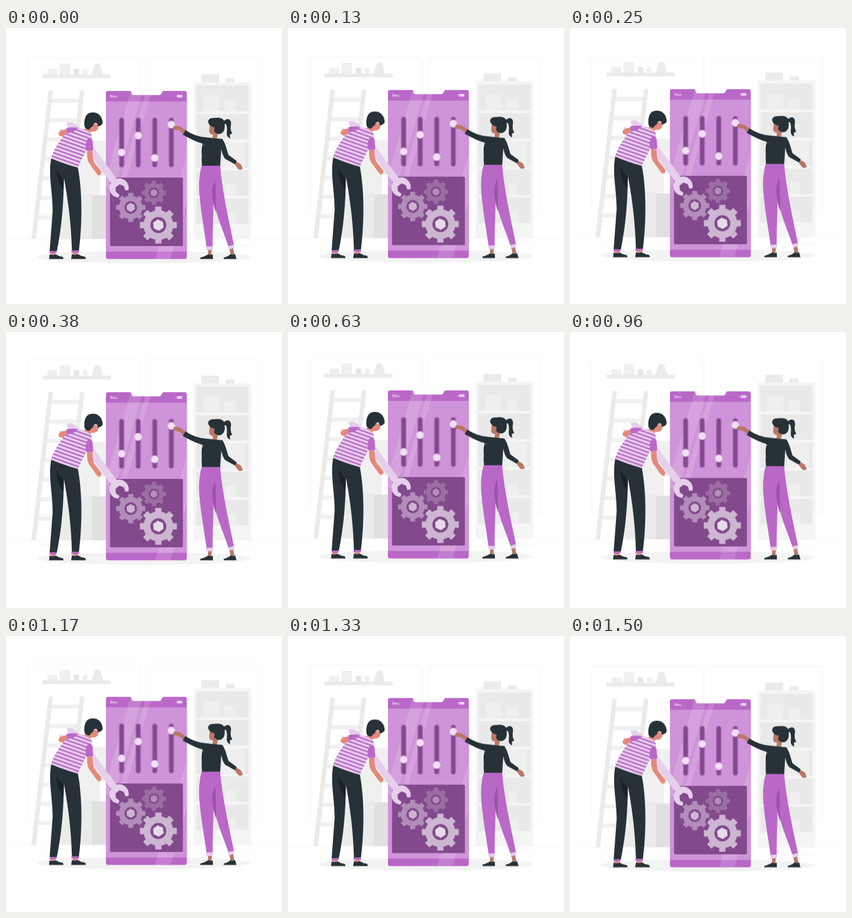
Recreate the animation shown at these times as an HTML page. Size 500 by 500 pixels, loop 1540 ms.

```html
<!DOCTYPE html>
<html lang="en">
<head>
<meta charset="utf-8">
<title>Phone settings</title>
<style>
  html, body { margin: 0; width: 100%; height: 100%; overflow: hidden; background: #fff; }
  svg { display: block; width: 100%; height: 100%; }
  #scene { animation: float 1.54s linear -40ms infinite; }
  @keyframes float {
    0%, 100% { transform: translateY(.5px); }
    50% { transform: translateY(-9.5px); }
  }
  .dark { fill: #263238; }
  .main { fill: #ba68c8; }
  .pale { fill: #e6cfeb; }
  .skin { fill: #e4897b; }
  .tan { fill: #b97764; }
</style>
</head>
<body>
<svg viewBox="0 0 500 500">
  <defs>
    <pattern id="stripes" width="20" height="6.6" patternUnits="userSpaceOnUse" patternTransform="translate(82 236) rotate(19.5)">
      <rect width="20" height="6.6" fill="#e6cfeb"/>
      <rect width="20" height="2.7" y="1" fill="#ba68c8"/>
    </pattern>
    <clipPath id="body">
      <path d="M185 114H225Q226.500 114 227 116L228 119.500Q229 121.500 231 121.500H278Q280 121.500 281 119.500L283 116Q284 114 286 114H323.500Q327.500 114 327.500 118V414.500Q327.500 418.500 323.500 418.500H185Q181 418.500 181 414.500V118Q181 114 185 114Z"/>
    </clipPath>
  </defs>
  <g id="scene">
    <!-- room -->
    <g fill="none" stroke="#f5f5f5">
      <rect x="39" y="54.500" width="203" height="282" rx="3"/>
      <rect x="255" y="54.500" width="203" height="282" rx="3"/>
      <path d="M0 382.300H500M57 390.500H115M412 394.500H447"/>
    </g>
    <g fill="#f0f0f0">
      <path d="M75 74H93V84H75ZM97 65H116V84H97Z"/>
      <circle cx="143.500" cy="79" r="5"/>
      <path fill="#e6e6e6" d="M123 74H132.500V84H123Z"/>
      <path fill="#ebebeb" d="M161 65H170L176 84H155ZM66 84H189.500V91H66Z"/>
      <path d="M118 204H181V268H170V382H118Z"/>
      <path fill="#ebebeb" d="M98 300H156V382H98Z"/>
      <path fill="#e0e0e0" d="M156 303H181V382H156Z"/>
    </g>
    <g id="rungs" fill="#f0f0f0"></g>
    <path fill="#ebebeb" d="M77 113.500H85L54.500 382H46ZM134 113.500H142L111.500 382H103Z"/>
    <!-- bookcase -->
    <path fill="#ebebeb" d="M354 84H386V98H354ZM398 91H414V98H398Z"/>
    <path fill="#f5f5f5" d="M340 98H444.500V382H340Z"/>
    <path fill="#e9e9e9" d="M345 104H439V355H345Z"/>
    <path fill="#efefef" d="M357 122H386V151H357ZM396 130H416V151H396ZM393 207H433V253H393ZM398 283H416V304H398ZM396 334H417V355H396Z"/>
    <path fill="#f5f5f5" d="M345 151H439V156H345ZM345 202H439V207H345ZM345 253H439V258H345ZM345 304H439V309H345Z"/>
    <ellipse cx="249.500" cy="415" rx="193.500" ry="11.500" fill="#f3f3f3"/>
    <!-- phone -->
    <g clip-path="url(#body)">
      <path class="main" d="M181 114H328V419H181Z"/>
      <path fill="#ce93d8" d="M181 133H328V405H181Z"/>
      <path fill="#fff" opacity=".14" d="M226 114H248L197 290H175ZM254 114H264L213 290H203ZM327.500 230V316L298 418.500H270Z"/>
    </g>
    <path class="pale" d="M189.500 121H191.500V126H189.500ZM193 122H195V126H193ZM196.300 122.700H198.300V126H196.300ZM199.600 123.400H201.500V126H199.600ZM310 121H319.500V126H310ZM307.500 122.500H309.200V124.500H307.500Z"/>
    <g id="sliders"></g>
    <rect x="188.500" y="271" width="132" height="124" rx="2" fill="#82498c"/>
    <g id="gears"></g>
    <!-- wrench -->
    <g class="pale">
      <path d="M109.500 172Q115 168.500 123 172L132 182L122 187L113 181Z"/>
      <g transform="translate(205 290) rotate(53.500)">
        <rect x="-142" y="-6.500" width="130" height="13" rx="5"/>
        <path d="M13 11.500A17.500 17.500 0 1 1 13 -11.500L10 -6.500L2 -9L-5 -4.500V4.500L2 9L10 6.500Z"/>
      </g>
    </g>
    <!-- man -->
    <g>
      <path class="skin" d="M80.500 405H90L89 412H81ZM121 404H130L130 411H121Z"/>
      <path class="dark" d="M79 410Q85 412.500 90 410Q96 414 102 414.500Q104.500 415.500 104 418.500H78ZM119.500 409.500Q125 412 130 409.500Q136 413.500 142 414Q145 415 144.500 418.500H118Z"/>
      <path class="dark" d="M82 236C76 266 85 300 84.500 332L79 405H92C100 366 104 328 105 272C112 310 118 350 119.500 404H132C138 358 139 298 130 252Z"/>
      <path fill="#1a2226" d="M92 256Q94 264 104 273L104 294Q91 280 92 256Z"/>
      <path class="main" d="M79 404H92L91 408H79ZM118.500 403H132.500L132 407H118.500Z"/>
      <path class="skin" d="M112 183L101 185Q94 188 95.500 193Q98 198 106 196.500L113 190Z"/>
      <path class="pale" d="M96 186L98 182.500L101 183L100 186Z"/>
      <path class="skin" d="M141 184L150 178L157 173L168 174Q168 183 164 186Q159 189 155 187L151 192Z"/>
      <path class="dark" d="M142 177C141 162 146 152.500 157 153C169 152 176 164 175 173Q172 178 166 178Q167 173 163 172Q158 172 158 177L154 180L151 184Q143 184 142 177Z"/>
      <path fill="url(#stripes)" d="M113 182C124 179 141 181 150 188Q158 193 155 203L146 220L130 253Q104 246 81.500 236C86 220 98 203 109 190Z"/>
      <path class="main" d="M109.500 181Q122 179 131 181L122 188L110 191ZM147 202Q154 196 157 205L158 221Q152 224 145 222L144 211Z"/>
      <path class="skin" d="M147 222.500Q152 224 156.500 222Q157 238 160 244L172 259Q175 266 167 267Q163 263 160 258L150 244Q146 236 147 222.500Z"/>
    </g>
    <!-- woman -->
    <g>
      <path class="tan" d="M366 400H373L372 412H366ZM404 398L411 397L414 411H407Z"/>
      <path class="dark" d="M352 416Q361 413.500 366 410Q371 412 374.500 410L375 418.500H352ZM394.500 416Q403 413.500 407 409.500Q411 412 415 409.500L417.500 418.500H394.500Z"/>
      <path class="main" d="M355 249H388C391 292 404 350 413 393L403 396C393 365 379 337 376 307C376 340 374 370 374.500 397H363.500C357 350 346 295 351 268Q352 256 355 249Z"/>
      <path fill="#9a55a6" d="M378.500 274L373.500 293Q373 312 380.500 335C380 310 381 292 378.500 274Z"/>
      <path class="pale" d="M362 396L375.500 395.500L375 402L363 402.500ZM402 395.500L413 392.500L414 398L404 401.500Z"/>
      <path class="tan" d="M325 185L315 178L304 177Q302.500 181 304.500 184L313 185L321 191ZM416 242Q424 245 426 248L429 255Q426 258 421 256L415 248Z"/>
      <path class="tan" d="M369 177L382 172L385 188L382 200H374L375 193Q368 193 368 186Z"/>
      <path class="dark" d="M366 170Q367 162 377 163Q391 161 395 168C403 161 409 167 407.500 175C406 183 408 188 410 191L405.500 193L406 200Q399 197 400 189C401 181 400 172 396 174Q398 188 388 192Q380 192 377 187L378 180Q368 179 366 170Z"/>
      <path class="dark" d="M362 198Q378 200 392 201C398 210 400 221 403 230L418 241L415 247L397 237C392 230 391 224 390 219L388 249.500H355Q353 228 358 210Q342 206 320 193L325 185Q343 197 362 198Z"/>
      <path fill="#1a2226" d="M362 199Q357 205 357 219L354.500 230Q354 216 357 208Z"/>
    </g>
  </g>
</svg>
<script>
  const fill = (id, list, draw) =>
    document.getElementById(id).innerHTML = list.map(draw).join('');

  // x follows the slant of the ladder legs
  fill('rungs', [0, 1, 2, 3, 4, 5, 6], i => {
    const y = 128 + i * 35.2, x = 81 - (y - 113) * .115;
    return `<rect x="${x}" y="${y}" width="57" height="7.5"/>`;
  });

  fill('sliders', [[209.5, 225.5], [239.5, 195], [269.5, 235.5], [299.5, 175]], ([x, y]) => `
    <g fill="none" stroke-linecap="round">
      <path d="M${x} 167V248" stroke="#aa66b7" stroke-width="10"/>
      <path d="M${x} 167V248" stroke="#82498c" stroke-width="6.5"/>
    </g>
    <circle cx="${x}" cy="${y}" r="7.2" fill="#e3c5e9"/>
    <circle cx="${x}" cy="${y}" r="5.6" fill="#f1e1f4"/>`);

  const gears = [
    { x: 268, y: 298.5, r: 22, color: '#9b6da3', nut: '#b48fbb' },
    { x: 226, y: 325, r: 26.5, color: '#b28dba', nut: '#cdb6d1' },
    { x: 276, y: 357, r: 33.5, color: '#cdb6d1', nut: '#e6dbe8' }
  ];

  fill('gears', gears, ({ x, y, r, color, nut }) => {
    const w = r * .34;
    const teeth = [0, 45, 90, 135].map(a =>
      `<rect x="${-w / 2}" y="${-r}" width="${w}" height="${2 * r}" rx=".8" transform="rotate(${a})"/>`);
    const hex = [0, 1, 2, 3, 4, 5].map(i => {
      const a = (i * 60 - 96) * Math.PI / 180;
      return `${r * .31 * Math.cos(a)},${r * .31 * Math.sin(a)}`;
    });
    return `<g transform="translate(${x} ${y})" fill="${color}">
      ${teeth.join('')}<circle r="${r * .81}"/>
      <circle r="${r * .43}" fill="#82498c"/>
      <polygon points="${hex.join(' ')}" fill="${nut}"/></g>`;
  });
</script>
</body>
</html>
```
